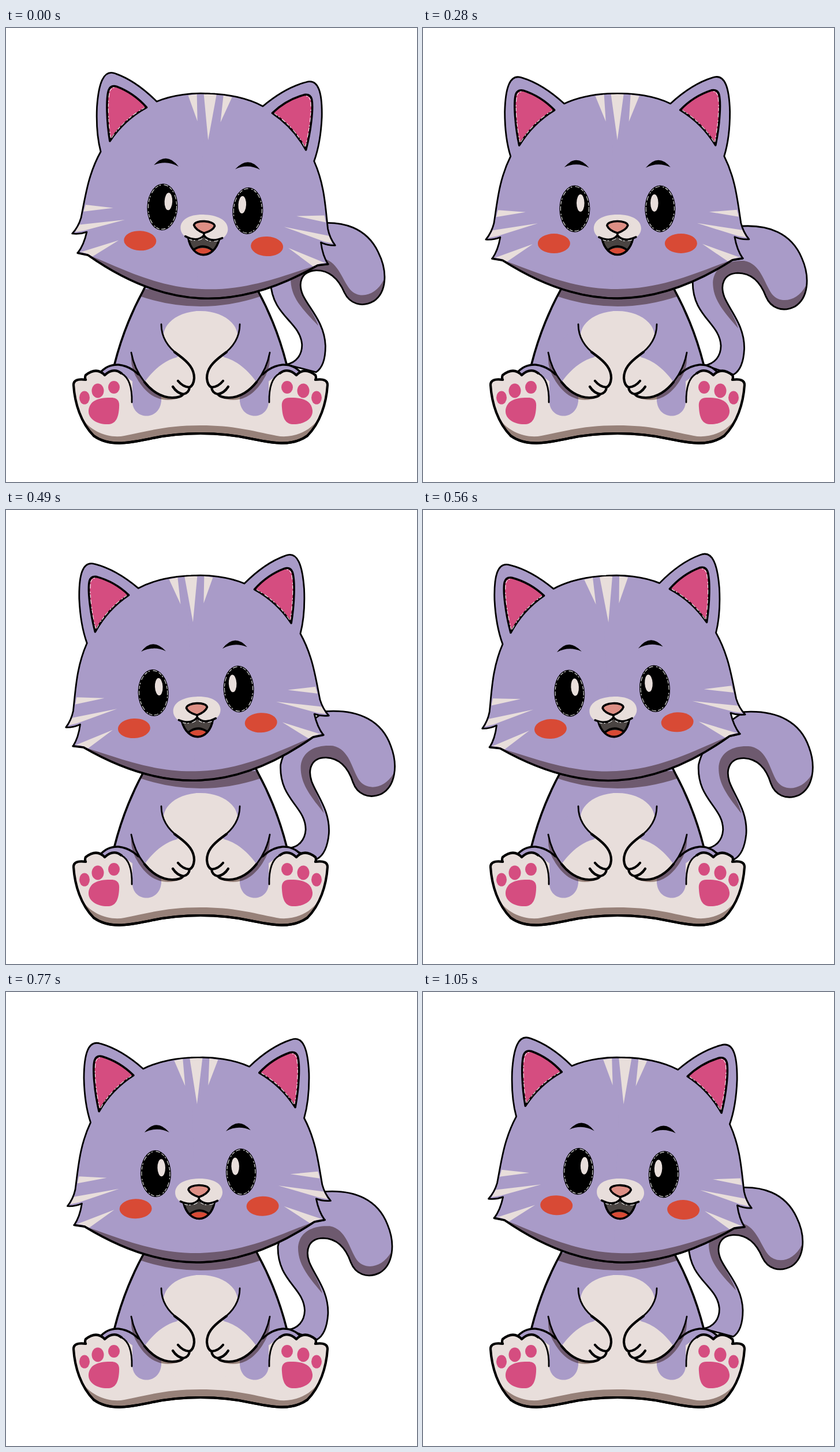
Animation of 712 by 786 pixels, one loop 1120 ms. Source, as an HTML page:

```html
<!DOCTYPE html>
<html lang="en">
<head>
<meta charset="utf-8">
<title>Purple kitten</title>
<style>
  html, body { margin: 0; width: 100%; height: 100%; overflow: hidden; background: #fff; }
  svg { display: block; width: 100%; height: 100%; }
  path, ellipse { stroke-linecap: round; stroke-linejoin: round; }
  .fur { fill: #a99bc8; }
  .cream { fill: #e8dedb; }
  .pink { fill: #d54d80; }
  .red { fill: #d84a35; }
  .shade { fill: #a6948d; mix-blend-mode: multiply; }
  .bold { stroke: #000; stroke-width: 4.2; }
  .line { stroke: #000; stroke-width: 3.6; }
  .thin { stroke: #000; stroke-width: 2.8; }
  .none { fill: none; }
  .glint { fill: none; stroke: #fff; stroke-width: 1; stroke-dasharray: 5 3 2 6 7 4; }
</style>
</head>
<body>
<svg viewBox="0 0 712 786">
  <defs>
    <path id="tailShape" d="M540,344 C600,337 639,357 656,398 C671,432 667,468 644,482 C622,493 602,484 594,465
      C585,441 570,424 545,424 C520,425 514,445 522,466 C532,490 557,515 556.5,555 Q555,590 538,600 L487,584
      C505,582 516,568 516,550 C514,510 467,500 467,440 Q475,390 540,344Z"/>
  </defs>

  <g id="tail">
    <use href="#tailShape" class="fur"/>
    <path class="shade" d="M546,520 C520,490 502,470 502,440 C504,412 530,402 556,403 C585,408 590,440 604,460
      C618,478 648,474 663,446 C661,469 654,476 644,482 C622,493 602,484 594,465 C585,441 570,424 545,424
      C520,425 514,445 522,466 C528,484 540,500 546,520Z"/>
    <use href="#tailShape" class="thin none"/>
  </g>

  <!-- Left halves are mirrored around x = 337 -->
  <g id="bodyHalf">
    <path class="fur" d="M345,440 H245 L237,456 Q205,515 188,582 V650 H345Z"/>
    <path class="line none" d="M243,444 L237,456 Q205,515 188,582"/>
    <path class="fur line" d="M162,598 Q175,582 195,583 Q222,586 240,613"/>
    <path class="fur" d="M195,590 L240,605 V650 H200Z"/>
    <path class="cream" d="M345,490 H337 C302,490 276,508 273,530 L269,560 V650 H218 L225,710 H260 L345,702Z"/>
    <path class="cream bold" d="M200,598 Q186,587 171,601 Q157,586 138,601 Q136,605 138,609
      Q117,606 117,618 C119,650 130,684 152,706 C180,726 215,718 250,711 Q290,702 337,702 H345"/>
    <path class="cream" d="M200,598 Q219,608 218,648 L240,710 H160Z"/>
    <path class="fur" d="M219,604 V648 C221,680 268,680 269,644 V604Z"/>
    <path class="thin none" d="M200,598 Q219,608 218,648"/>
    <path class="pink" d="M143,662 C145,645 160,640 180,640 C195,639 197,648 196,657 C195,675 190,685 178,686
      C160,687 142,678 143,662Z"/>
    <ellipse class="pink" cx="136" cy="640" rx="9" ry="11.5"/>
    <ellipse class="pink" cx="159" cy="628" rx="10.5" ry="12.5"/>
    <ellipse class="pink" cx="187" cy="622" rx="10" ry="11"/>
    <path class="shade" d="M217,566 Q215,590 230,612 C245,635 268,653 305,639 L286,630 L240,613Z"/>
    <path class="fur" d="M269,513 Q269,545 300,567 L240,613 Q222,590 217,562Z"/>
    <path class="cream" d="M240,613 C258,588 280,572 302,569 C316,579 326,590 326,606 Q325,619 318,622
      Q317,632 307,634 Q303,640 288,640 C268,640 251,627 240,613Z"/>
    <path class="thin none" d="M269,513 Q269,545 300,567 M240,613 Q222,590 217,562"/>
    <path class="bold none" d="M292,561 L300,567 C316,579 326,590 326,606 Q325,619 318,622 Q307,622 298,611
      M318,622 Q317,632 307,634 Q296,632 289,621 M307,634 Q303,640 288,640 C268,640 251,627 240,613"/>
  </g>
  <use href="#bodyHalf" transform="translate(674) scale(-1 1)"/>
  <path class="shade" d="M130,672 C145,700 180,711 205,706 C250,697 280,688 337,688 S424,697 469,706
    C494,711 529,700 544,672 Q536,692 522,706 C494,726 459,718 424,711 Q384,702 337,702
    Q290,702 250,711 C215,718 180,726 152,706 Q138,692 130,672Z"/>
  <path class="bold none" d="M152,706 C180,726 215,718 250,711 Q290,702 337,702 Q384,702 424,711
    C459,718 494,726 522,706"/>
  <path class="shade" d="M239,452 L234,465 Q337,499 440,465 L435,452Z"/>

  <g id="head">
    <g id="headHalf">
      <path class="fur thin" d="M345,113.5 H337 C308,112.5 272,118 245,131 Q208,97 172,86 C150,78 143,105 142,145
        Q142,190 152,222 C132,262 129,300 123,338 Q119,354 109,366 Q122,367 134,362 Q130,385 120,399 L138,402
        C185,432 255,468 337,468 H345"/>
      <path class="pink line" d="M167,203 C160,170 157,130 161,115 Q164,106 174,108 Q205,118 228,142
        Q190,165 167,203Z"/>
      <path class="glint" d="M168,197 C162,165 160,135 163,117 Q166,109 174,110 M224,143 Q190,164 170,197"/>
      <path class="cream" d="M299,118 L314,115.5 L317,162Z M130,315 L178,318.5 L127,327Z
        M121,350 L199,338 L129,360 L114,363Z M129,396 L190,374 L146,404 L135,399 L124,397Z"/>
      <path d="M245,241 Q266,216 288,242 Q267,231 245,241Z"/>
      <ellipse cx="263" cy="313" rx="26.5" ry="40.5"/>
      <ellipse class="glint" cx="263" cy="313" rx="24.5" ry="38.5"/>
      <ellipse class="cream" cx="273" cy="303" rx="6.8" ry="15"/>
      <ellipse class="red" cx="227" cy="373" rx="28" ry="17"/>
    </g>
    <use href="#headHalf" transform="translate(674) scale(-1 1)"/>
    <path class="cream" d="M326,115 Q337,114 348,115 L337,194Z"/>
    <path class="shade" d="M124,397 C185,416 250,452 337,452 S489,416 550,397 L536,402
      C489,432 419,468 337,468 S185,432 138,402Z"/>
    <path class="line none" d="M120,399 L138,402 C185,432 255,468 337,468 S489,432 536,402 L554,399"/>

    <path class="thin" fill="#4a4442" d="M310,364 C318,402 356,402 364,364 L337,359Z"/>
    <path class="red" d="M321,385 Q337,377 353,385 Q337,398 321,385Z"/>
    <path class="line none" d="M321,384 Q337,372 353,384 M310,364 C318,402 356,402 364,364"/>
    <path class="cream" d="M337,323 C363,323 378,333 378,347 C378,366 348,375 337,360
      C326,375 296,366 296,347 C296,333 311,323 337,323Z"/>
    <path class="line none" d="M305,362 Q326,372 337,359 Q348,372 369,362 M337,355 V359"/>
    <path class="glint" d="M312,367 Q328,371 336,363 M340,365 Q348,371 362,367"/>
    <path class="line" fill="#dd8f85" d="M319,342 C320,332 354,332 355,342 Q352,350 337,355 Q322,350 319,342Z"/>
  </g>
</svg>
<script>
  const STEP = 70, HALF = 8;
  // Share of the swing completed at each step from one side to the other
  const swing = [0, 0.093, 0.195, 0.32, 0.465, 0.665, 0.8, 0.91, 1];
  const head = document.getElementById('head');
  const tail = document.getElementById('tail');

  function draw() {
    const step = Math.floor(performance.now() / STEP) % (2 * HALF);
    const angle = 2.55 - 5.6 * swing[HALF - Math.abs(HALF - step)];
    head.setAttribute('transform', `rotate(${angle} 337 490)`);
    tail.setAttribute('transform', `rotate(${-1.12 * angle} 455 615)`);
    requestAnimationFrame(draw);
  }
  draw();
</script>
</body>
</html>
```
